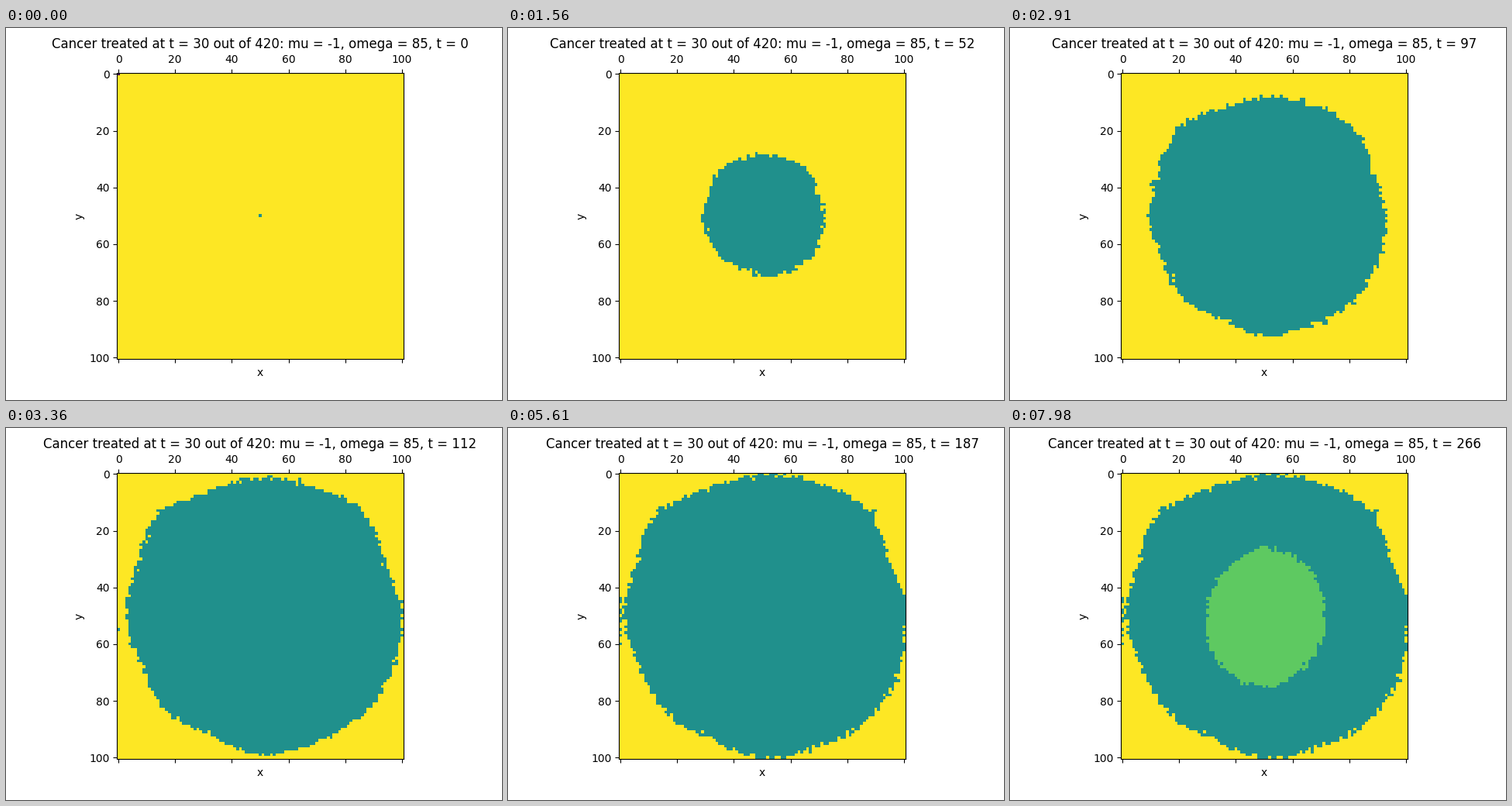
Recreate the animation shown at these times as a matplotlib script. Size 640x480 px, loop 8 s.

```python
import numpy as np
import matplotlib.pyplot as plt
from matplotlib.animation import FuncAnimation

N, MID = 101, 50
LOOP, FRAMES = 8000, 267
EMPTY, TUMOUR, MUTANT = 4, 2, 3
HALT = 115          # the tumour stops spreading here
MUTATION = 209      # the second cell type appears here

# Final radii at even angles, clockwise from the right.
TUMOUR_REACH = [51.3, 52, 52, 50.3, 50.5, 47, 48.5, 46.5,
                48.5, 47.8, 52.5, 48.5, 50, 50.5, 53.5, 49]
MUTANT_REACH = [21.5, 22.5, 25, 23, 20.5, 20.5, 24, 23]

rng = np.random.default_rng(85)
rows, cols = np.mgrid[:N, :N] - MID
dist = np.hypot(cols, rows)
angle = np.arctan2(rows, cols)


def arrival(start, lag, end, reach):
    """Time at which each cell is taken: a steady, ragged front per angle."""
    spokes = np.linspace(0, 2 * np.pi, len(reach), endpoint=False)
    radius = np.interp(angle, spokes, reach, period=2 * np.pi)
    when = start + lag + (end - start - lag) * dist / radius
    when = np.maximum(when + rng.normal(0, 1.4, (N, N)), start + 1)
    when[MID, MID] = start
    # A cell can only be taken after one of its neighbours.
    for _ in range(3):
        p = np.pad(when, 1, mode="edge")
        near = np.minimum.reduce([p[:-2, 1:-1], p[2:, 1:-1],
                                  p[1:-1, :-2], p[1:-1, 2:]])
        when = np.maximum(when, near + 0.4)
        when[MID, MID] = start
    # Growth spills over from the right and bottom edges.
    for grid in (when, when.T):
        grid[:, 0] = np.minimum(grid[:, 0], grid[:, -1] + rng.uniform(0, 3, N))
    return when


tumour = arrival(0, 4.5, HALT, TUMOUR_REACH)
mutant = arrival(MUTATION, 4.5, FRAMES - 1, MUTANT_REACH)


def cells(t):
    grid = np.full((N, N), EMPTY)
    grid[tumour <= min(t, HALT)] = TUMOUR
    grid[mutant <= t] = MUTANT
    if t == 0:
        grid[0, 0] = 0
    return grid


fig, ax = plt.subplots(figsize=(6.4, 4.8), dpi=100)
image = ax.matshow(cells(0), cmap="viridis", vmin=0, vmax=4)
ax.set_xlabel("x")
ax.set_ylabel("y")
title = ax.set_title("")


def draw(t):
    image.set_data(cells(t))
    title.set_text("Cancer treated at t = 30 out of 420: "
                   f"mu = -1, omega = 85, t = {t}")
    return image, title


anim = FuncAnimation(fig, draw, frames=FRAMES, interval=LOOP / FRAMES,
                     init_func=lambda: draw(0), repeat=True, repeat_delay=0)
plt.show()
```
